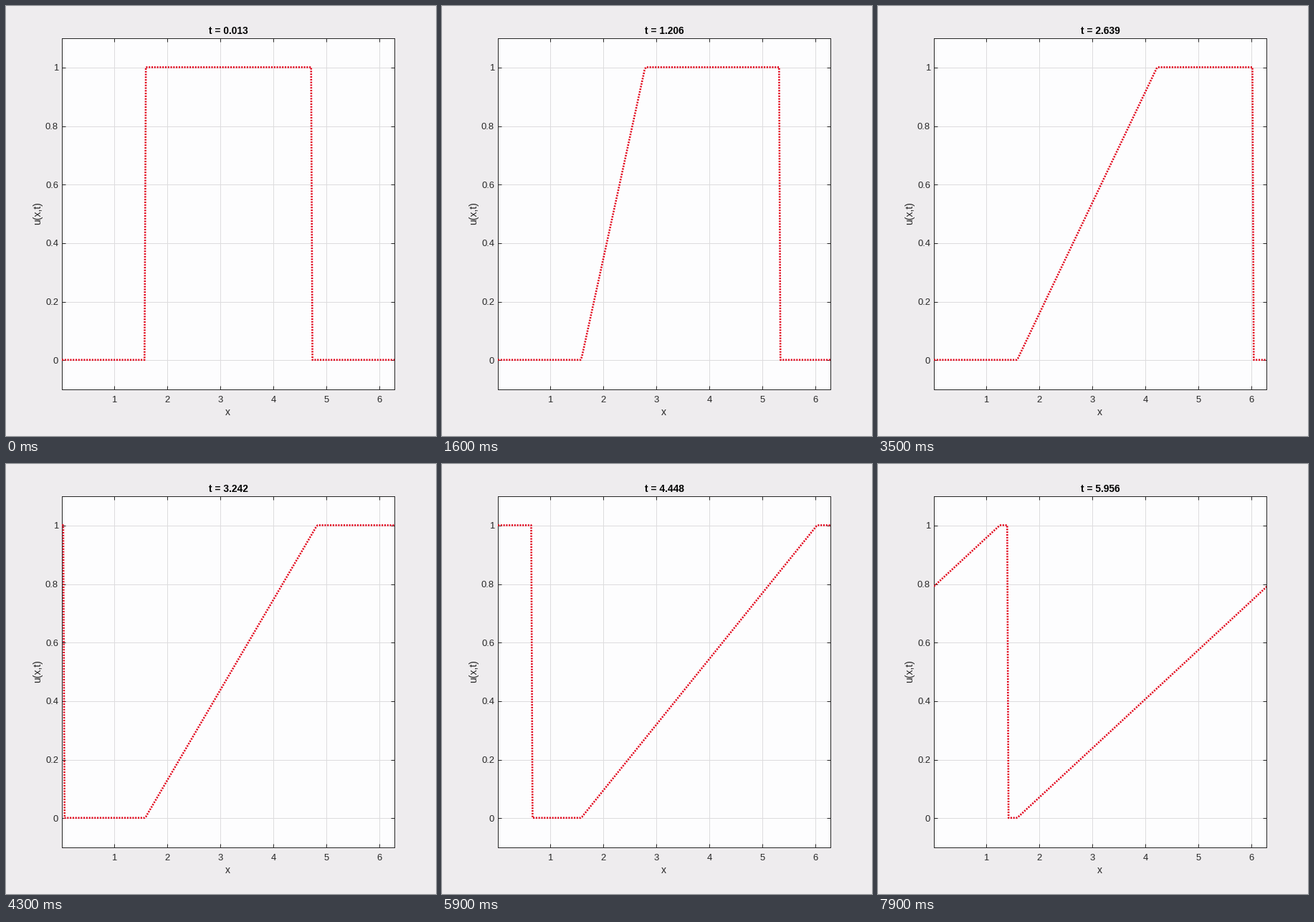
Recreate the animation shown at these times as a matplotlib script. Size 600x600 px, loop 8000 ms.

```python
import numpy as np
import matplotlib.pyplot as plt
from matplotlib.animation import FuncAnimation
from matplotlib.transforms import Affine2D

SIZE, DPI = 600, 100
PT = 72 / DPI                      # points per pixel
LEFT, RIGHT, BOTTOM, TOP = 77.5, 542.4, 64.9, 554.9
CELLS, STEPS, FRAMES = 250, 6, 80
DX = 2 * np.pi / CELLS
DT = DX / 2
INK = "#262626"

plt.rcParams["font.family"] = "Liberation Sans"
fig = plt.figure(figsize=(SIZE / DPI, SIZE / DPI), dpi=DPI, facecolor="#eeecee")
ax = fig.add_axes([LEFT / SIZE, BOTTOM / SIZE,
                   (RIGHT - LEFT) / SIZE, (TOP - BOTTOM) / SIZE],
                  facecolor="#fdfdfe")
ax.set(xlim=(0, 2 * np.pi), ylim=(-0.1, 1.1))
xticks, yticks = np.arange(1, 7), np.arange(6) / 5
ax.set_xticks(xticks)
ax.set_yticks(yticks)
ax.tick_params(direction="in", length=5 * PT, width=PT, color=INK,
               top=True, right=True, labelleft=False, labelbottom=False)
ax.grid(color="#dddcde", linewidth=PT)
ax.set_axisbelow(True)
for spine in ax.spines.values():
    spine.set(color=INK, linewidth=PT)


def label(x, y, text, px=13, ha="center", color=INK, **kw):
    """Text with its baseline at pixel (x, y), measured from the top left."""
    return fig.text(x / SIZE, 1 - y / SIZE, text, fontsize=px * PT, ha=ha,
                    va="baseline", color=color, rotation_mode="anchor", **kw)


for v in xticks:
    label(LEFT + v / (2 * np.pi) * (RIGHT - LEFT) - 0.4, 552.7, f"{v}")
for v in yticks:
    y = BOTTOM + (v + 0.1) / 1.2 * (TOP - BOTTOM)
    label(73, SIZE - y + 4.5, f"{v:g}", ha="right")
label(309.7, 571, "x", 14)
label(48, 289, "u(x,t)", 14, rotation=90)
title = label(310.3, 39, "", 13.7, color="black", weight="bold")

# Grid lines snap to pixel centres, so the curve moves half a pixel with them.
to_centre = ax.transData + Affine2D().translate(0.5, 0.5)
cells = np.arange(CELLS + 1)
line, = ax.plot([], [], color="#e2061c", linewidth=2.6 * PT,
                linestyle=(0, (0.8, 0.66)), dash_capstyle="butt",
                solid_joinstyle="round", zorder=3, transform=to_centre)


def wave(step):
    """Burgers solution of a box: a rarefaction fan followed by a shock."""
    pos = (cells - CELLS / 4) % CELLS
    fan = np.clip(2 * pos / step, 0, 1)
    return np.where(pos < CELLS / 2 + step / 4, fan, 0)


def update(i):
    step = max(1, STEPS * i)
    line.set_data(cells * DX, wave(step))
    title.set_text(f"t = {step * DT:.3f}")
    return line, title


anim = FuncAnimation(fig, update, frames=FRAMES, interval=100,
                     repeat=True, repeat_delay=0)
plt.show()
```
